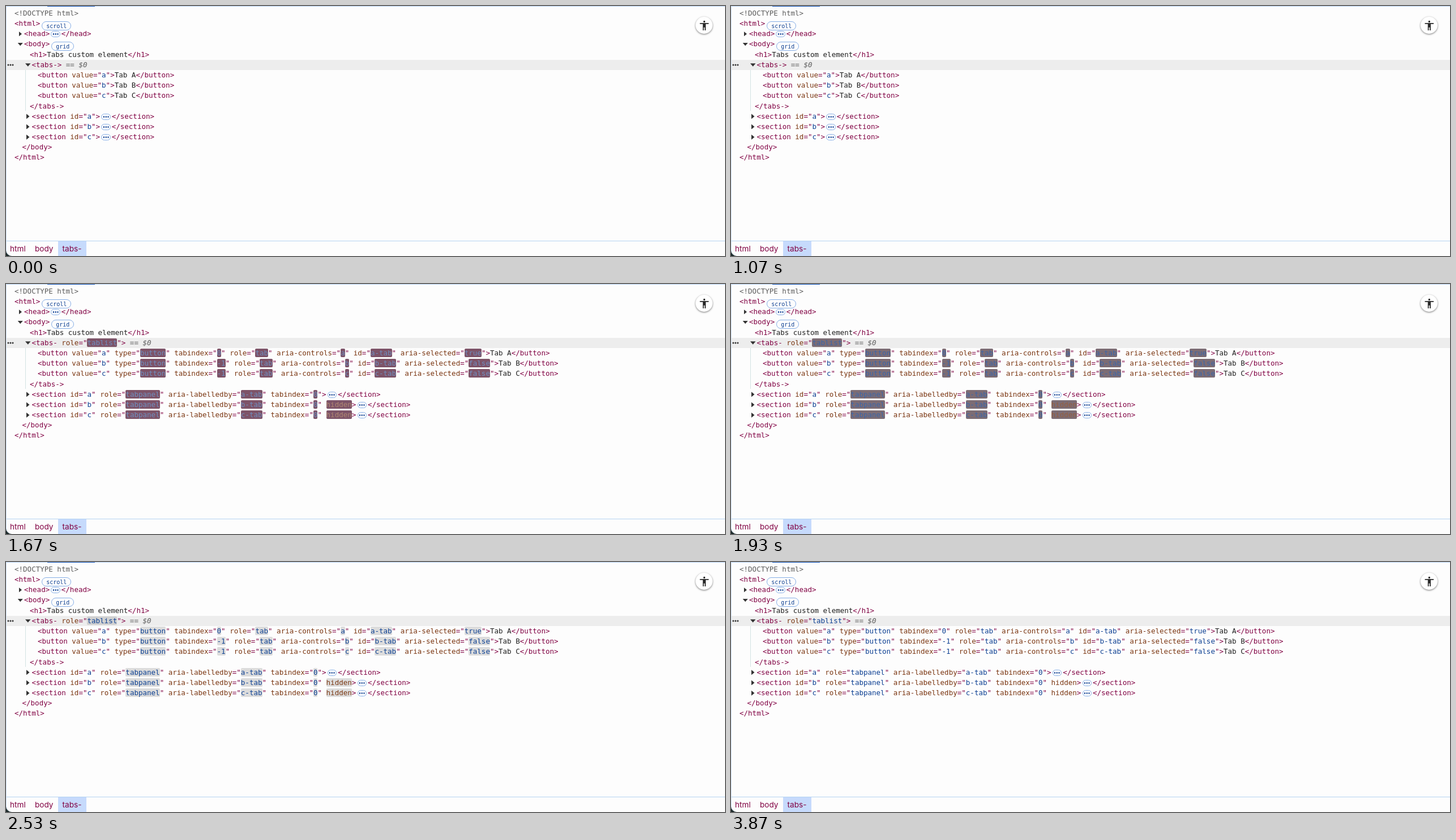
Recreate the animation shown at these times as an HTML page. Size 1270 px wide and 441 px high, loop 3.94 s.

```html
<!DOCTYPE html>
<html lang="en">
<head>
<meta charset="utf-8">
<title>Elements panel</title>
<style>
  :root { --tag: #800042; --attr: #7a3510; --value: #0c3f92; }
  html, body { margin: 0; width: 100%; height: 100%; overflow: hidden; background: #1c2929; }
  #panel {
    position: absolute; left: 0; top: 0; width: 1270px; height: 441px; overflow: hidden;
    box-sizing: border-box; border-left: 1px solid #d3e3f5; border-radius: 0 0 0 10px; background: #fdfdfd;
  }
  #tree, #panel > * { position: absolute; }
  #tree { left: -1px; top: 0; width: 1270px; font: 12.533px/18.18px "DejaVu Sans Mono", monospace; color: var(--tag); }
  .row { position: absolute; left: 0; width: 100%; height: 18.18px; white-space: pre; box-sizing: border-box; }
  .selected { background: #ededed; }
  .text { color: #1f1f1f; }
  .meta { color: #5c5c5c; }
  .attr { color: var(--attr); }
  .value { color: var(--value); }
  .flash { border-radius: 2px; }
  .plain .added { display: none; }
  .arrow { position: absolute; background: #333; }
  .closed { width: 5.5px; height: 9px; top: 4.6px; margin-left: 4px; clip-path: polygon(0 0, 100% 50%, 0 100%); }
  .open { width: 9.5px; height: 5.5px; top: 6.4px; margin-left: 2px; clip-path: polygon(0 0, 100% 0, 50% 100%); }
  .badge {
    display: inline-block; box-sizing: border-box; height: 16px; margin-left: 3px; padding: 0 7px;
    border: 1px solid #86aee6; border-radius: 8px; font-size: 10px; line-height: 15px;
    color: var(--value); vertical-align: -4px;
  }
  .dots {
    display: inline-block; box-sizing: border-box; width: 16.2px; height: 11px; margin: 0 2.2px;
    border: 1px solid #86aee6; border-radius: 6px; vertical-align: -2px;
    background: radial-gradient(circle, var(--value) 1px, transparent 1.5px) center / 3.8px 9px repeat-x content-box;
    padding: 0 1.4px;
  }
  .more {
    position: absolute; left: 2px; top: 7px; width: 12px; height: 4px;
    background: radial-gradient(circle, #333 1.2px, transparent 1.8px) 0 0 / 4px 4px;
  }
  .guide { left: 33px; top: 113px; width: 1px; height: 72px; background: #d3e3e3; }
  .edge { left: -1px; top: 0; width: 1270px; height: 1px; background: #b9d5f5; }
  .active { left: 72px; top: 0; width: 84px; height: 1px; background: #0b4fb8; }
  .crumbs { left: -1px; top: 414px; width: 1270px; height: 27px; box-sizing: border-box; border-top: 1px solid #b5d3f2; }
  .crumbs span {
    position: absolute; top: 0; height: 26px; font: 13.6px/27px Inter, sans-serif; color: var(--tag);
  }
  .crumbs .current { left: 92px; width: 42.5px; padding-left: 7.5px; background: #c6dafc; }
  .access { left: 1217px; top: 19px; width: 30px; height: 30px; border-radius: 50%; background: #fff; box-shadow: 0 1px 3px 1px #0003, 0 1px 2px #0004; }
  .access svg { position: absolute; left: 4.9px; top: 4.6px; width: 20.8px; height: 20.8px; fill: #2b2b2b; }
</style>
</head>
<body>
<div id="panel" class="plain">
  <div id="tree"></div>
  <div class="guide"></div>
  <div class="edge"></div>
  <div class="active"></div>
  <div class="access"><svg viewBox="0 0 24 24"><path d="M12 2a2 2 0 0 1 0 4a2 2 0 0 1 0-4zM21 9h-6v13h-2v-6h-2v6H9V9H3V7h18z"/></svg></div>
  <div class="crumbs">
    <span style="left:7px">html</span><span style="left:51px">body</span><span class="current">tabs-</span>
  </div>
</div>
<script>
  const LOOP = 3940, START = 1305, FLASH = 1400, FPS = 15;
  const ROW = 18.18, TOP = 3.9;
  const panel = document.getElementById('panel');
  const tree = document.getElementById('tree');

  const span = (cls, text) => `<span class="${cls}">${text}</span>`;
  const attr = (name, value, cls = '') =>
    ` ${span('attr', name)}="${span('value ' + cls, value)}"`;
  const added = attrs => span('added', Object.entries(attrs).map(([name, value]) =>
    value === true ? ' ' + span('attr flash', name) : attr(name, value, 'flash')).join(''));
  const open = (name, attrs = '') => `&lt;${name}${attrs}&gt;`;
  const close = name => `&lt;/${name}&gt;`;
  const badge = text => span('badge', text);
  const dots = span('dots', '');

  const button = (id, first) => open('button', attr('value', id) + added({
    type: 'button', tabindex: first ? 0 : -1, role: 'tab', 'aria-controls': id,
    id: id + '-tab', 'aria-selected': first
      ? 'true' : 'false'
  })) + span('text', 'Tab ' + id.toUpperCase()) + close('button');

  const section = (id, first) => open('section', attr('id', id) + added({
    role: 'tabpanel', 'aria-labelledby': id + '-tab', tabindex: 0, ...(first ? {} : { hidden: true })
  })) + dots + close('section');

  // Each row: indent, markup, arrow
  const rows = [
    [15, span('meta', '&lt;!DOCTYPE html&gt;')],
    [15, open('html') + badge('scroll')],
    [32, open('head') + dots + close('head'), 'closed'],
    [32, open('body') + badge('grid'), 'open'],
    [42, open('h1') + span('text', 'Tabs custom element') + close('h1')],
    [45.5, open('tabs-', added({ role: 'tablist' })) + span('meta', ' == <i>$0</i>') + span('more', ''), 'open'],
    ...['a', 'b', 'c'].map(id => [56, button(id, id === 'a')]),
    [42, close('tabs-')],
    ...['a', 'b', 'c'].map(id => [45.5, section(id, id === 'a'), 'closed']),
    [28.5, close('body')],
    [15, close('html')]
  ];

  tree.innerHTML = rows.map(([x, html, arrow], i) =>
    `<div class="row${i === 5 ? ' selected' : ''}" style="top:${TOP + i * ROW}px;padding-left:${x}px">` +
    (arrow ? `<span class="arrow ${arrow}" style="left:${x - 13.5}px"></span>` : '') + html + '</div>'
  ).join('');

  // Tag colour fades to grey, then to nothing; the text darkens over the whole time.
  const easing = 'cubic-bezier(0, 0, 0.2, 1)';
  const flashes = [...document.querySelectorAll('.flash')].map(el => {
    const flash = el.animate([
      { backgroundColor: '#800042', color: '#fff', easing },
      { backgroundColor: '#7b7b7b', offset: 0.8, easing },
      { backgroundColor: 'transparent', color: el.matches('.value') ? '#0c3f92' : '#7a3510' }
    ], { duration: FLASH, fill: 'both' });
    flash.pause();
    return flash;
  });

  function draw(now) {
    const t = Math.floor((now % LOOP + 5) * FPS / 1000) * 1000 / FPS;
    panel.classList.toggle('plain', t < START);
    const time = Math.min(Math.max(t - START, 0), FLASH);
    for (const flash of flashes) flash.currentTime = time;
  }

  const begin = performance.now();
  function tick() {
    draw(performance.now() - begin);
    requestAnimationFrame(tick);
  }
  tick();
</script>
</body>
</html>
```
